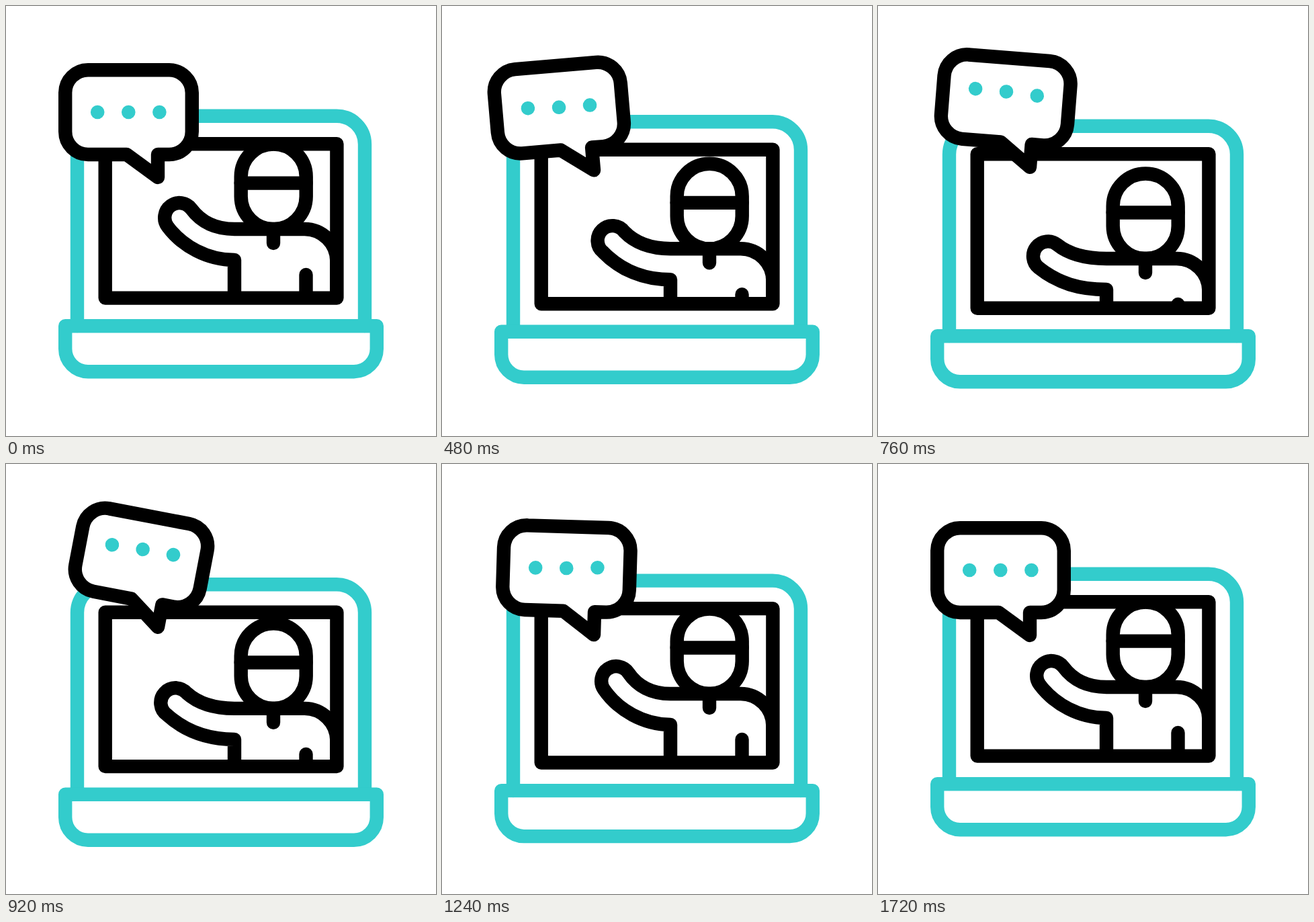
An HTML page for the animation above (1.76 s loop, 640x640 px).

```html
<!DOCTYPE html>
<html lang="en">
<head>
<meta charset="utf-8">
<title>Video call</title>
<style>
  html, body { margin: 0; width: 100%; height: 100%; overflow: hidden; background: #fff; }
  svg { display: block; width: 100%; height: 100%; }
  .line { fill: none; stroke: #000; stroke-width: 20.4; stroke-linecap: round; stroke-linejoin: round; }
  .teal { stroke: #3cc; }
  #bubble { transform-origin: 226px 255px; }
  #bubble path { fill: #fff; }
  .dot { fill: #3cc; stroke: none; }
</style>
</head>
<body>
<svg viewBox="0 0 640 640">
  <clipPath id="screen"><rect x="147.7" y="195" width="344.7" height="239.6"/></clipPath>
  <g class="line">
    <g id="laptop">
      <path class="teal" d="M106 476V206a42 42 0 0 1 42 -42.3H492a42 42 0 0 1 42 42.3V476"/>
      <path class="teal" d="M88.2 476.2H551.8V510a34 34 0 0 1 -34 34.2H122a34 34 0 0 1 -33.8 -34.2Z"/>
      <g clip-path="url(#screen)">
        <g id="person">
          <path id="body"/>
          <rect x="349.7" y="205.5" width="97" height="126.6" rx="48.5"/>
          <path d="M349.7 263.6H446.7M398 332V353M446.5 400V500"/>
        </g>
      </g>
      <rect x="147.7" y="205.2" width="344.7" height="229.4"/>
    </g>
    <g id="bubble">
      <path d="M122 95.3H243a34 34 0 0 1 33.8 33.8V187a34 34 0 0 1 -33.8 34H226v34L179.5 221H122a34 34 0 0 1 -33.8 -34V129a34 34 0 0 1 33.8 -33.8Z"/>
      <circle class="dot" cx="136.2" cy="158" r="10.3"/>
      <circle class="dot" cx="182.3" cy="158" r="10.3"/>
      <circle class="dot" cx="228.4" cy="158" r="10.3"/>
    </g>
  </g>
</svg>
<script>
const LOOP = 1760;
const $ = id => document.getElementById(id);

// Runs through [time in ms, value] steps, at rest (0) at both ends of the loop
function play(el, prop, format, ...steps) {
  const frames = [[0, 0], ...steps, [LOOP, 0]].map(([ms, value]) => ({
    offset: ms / LOOP,
    easing: 'cubic-bezier(.5,0,.5,1)',
    [prop]: format(value)
  }));
  el.animate(frames, { duration: LOOP, iterations: Infinity });
}

const shift = y => `0px ${y}px`;
const turn = degrees => `${degrees}deg`;

// Moves away from rest and back
const bob = (el, start, peak, end, distance) =>
  play(el, 'translate', shift, [start, 0], [peak, distance], [end, 0]);

function polar([x, y], radius, degrees) {
  const a = degrees * Math.PI / 180;
  return [x + radius * Math.cos(a), y + radius * Math.sin(a)];
}

// The hand orbits the shoulder and tilts as the arm drops
function bodyPath(drop) {
  const hand = polar([340, 355], 91, 206 - 8.6 * drop);
  const tilt = -36.6 - 14 * drop;
  const top = polar(hand, 22, tilt);
  const bottom = polar(hand, -22, tilt);
  return `M492.4 500V380A48 48 0 0 0 444.4 332H340` +
    `C311 332 ${polar(top, 24, tilt + 90).join(' ')} ${top.join(' ')}` +
    `A22 22 0 1 0 ${bottom.join(' ')}` +
    `C${polar(bottom, 37, tilt + 90).join(' ')} 300 378 340 378V500`;
}

$('body').setAttribute('d', bodyPath(0));

bob($('laptop'), 40, 880, 1720, 15.6);
bob($('person'), 165, 690, 1175, 29.8);
play($('body'), 'd', drop => `path("${bodyPath(drop)}")`,
  [320, 0], [640, 1.05], [840, 1.05], [1080, -.16], [1400, -.16], [1700, 0]);

bob($('bubble'), 150, 700, 1370, -15.3);
play($('bubble'), 'rotate', turn, [120, 0], [520, -5], [960, 11], [1360, 0]);
document.querySelectorAll('.dot').forEach((dot, i) => {
  const wait = i * 80;
  bob(dot, 320 + wait, 760 + wait, 1255 + wait, -13);
});
</script>
</body>
</html>
```
